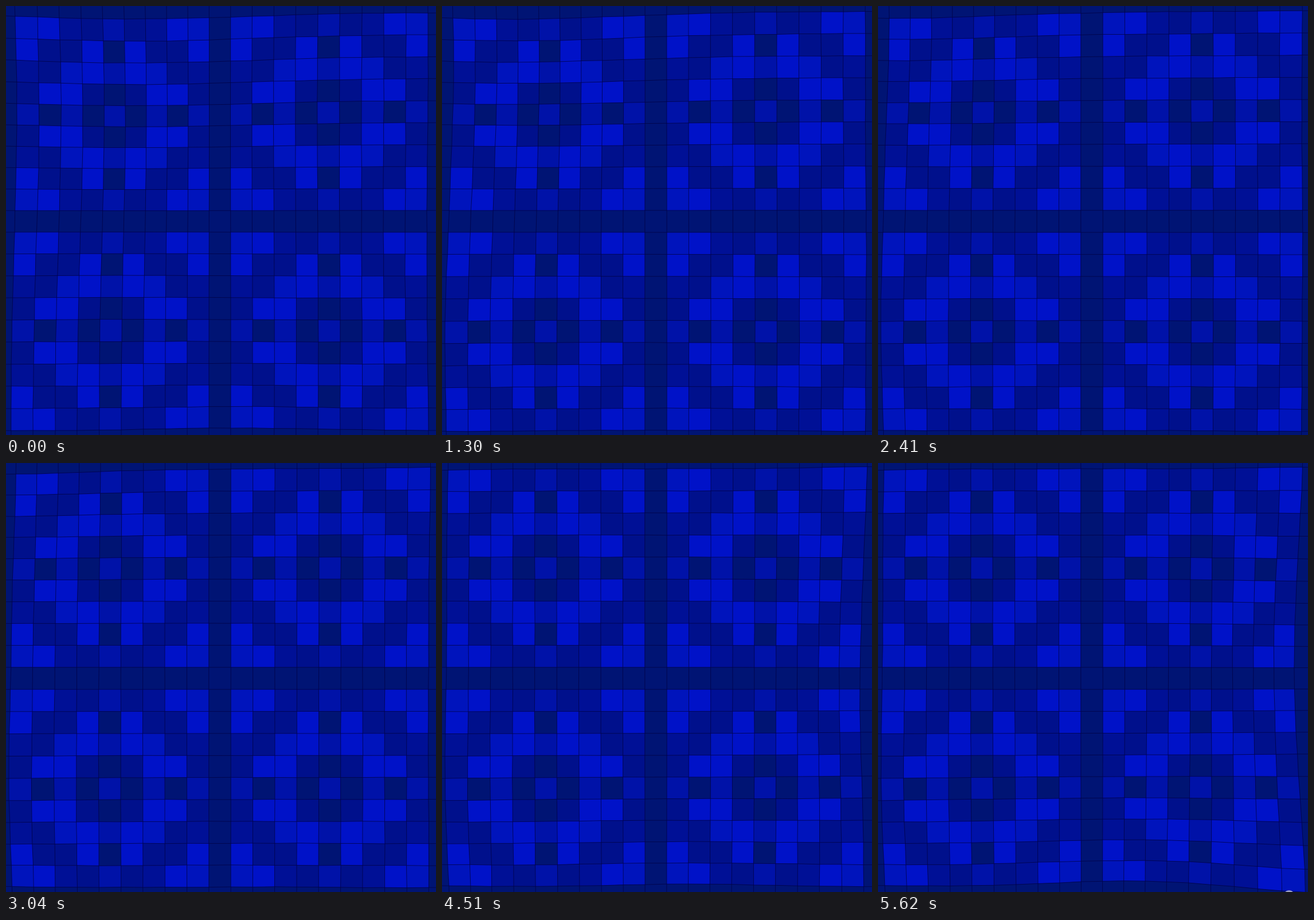
An HTML page with a canvas for the animation above (5.65 s loop, 750 px wide and 747 px high).

```html
<!DOCTYPE html>
<html lang="en">
<head>
<meta charset="utf-8">
<title>Woven grid</title>
<style>
html, body { margin: 0; width: 100%; height: 100%; overflow: hidden; background: #001474; }
canvas { display: block; width: 750px; height: 747px; }
</style>
</head>
<body>
<canvas id="stage" width="750" height="747"></canvas>
<script>
const ctx = document.getElementById('stage').getContext('2d');
const LOOP = 5650, CELL = 38, CX = 373, CY = 375, HALF = 10, EDGE = 9.5;

// Tint by product of the cell's column and row, modulo ten
const TINTS = ['#001474', '#0014bc', '#0012c8', '#001096', '#00108c', '#0012a8'];

// The cloth is stretched outwards from its centre by SWELL pixels at the edge.
// Soft dents drift over it and reduce the stretch; a negative depth bulges.
const SWELL = 3.8;
const pose = (time, x, y, size, depth) => ({ time, x, y, size, depth });
const DENTS = [
  // shrinks away through the upper left corner
  [pose(0, -4, -5, 8, 17), pose(4500, -13.5, -13.5, 5.5, 6)],
  // right edge, first bulging, then sinking in
  [pose(0, 12, 2, 6, 4), pose(2000, 12, 2, 7, -6), pose(4400, 12.5, 0.5, 6, 11), pose(5620, 12, -1, 6, 14)],
  // bottom edge
  [pose(0, 1, 12, 5, 6), pose(1800, 1, 12, 5, 0), pose(3700, 1, 12, 6, 3), pose(5620, 2, 12, 6.5, 14)],
  // lower left corner
  [pose(1300, -11, 11, 4, 0), pose(3700, -11, 11, 4, 6)],
  // left edge, below the middle
  [pose(0, -11, 7, 4, 0), pose(1000, -11, 5, 4, -4)],
  // upper right corner
  [pose(0, 11, -11, 5, 1), pose(4400, 11, -11, 5, -5)],
  // the pointer's tug at the lower right corner
  [pose(5100, 10, 10, 4, 0), pose(5620, 10, 10, 4, -12)]
];

const mix = (a, b, f) => a + (b - a) * f;

function poseAt(poses, t) {
  let i = 0;
  while (i < poses.length - 2 && t > poses[i + 1].time) i++;
  const a = poses[i], b = poses[i + 1];
  const f = Math.min(1, Math.max(0, (t - a.time) / (b.time - a.time)));
  return pose(t, mix(a.x, b.x, f), mix(a.y, b.y, f), mix(a.size, b.size, f), mix(a.depth, b.depth, f));
}

function stretch(dents, c, r) {
  return dents.reduce((sum, d) => {
    const far = ((c - d.x) ** 2 + (r - d.y) ** 2) / d.size ** 2;
    return sum - d.depth * Math.exp(-far);
  }, SWELL);
}

// Small unevenness of the threads, fading towards the pinned centre lines
function ripple(a, b, t) {
  const size = 0.5 * Math.min(1, Math.abs(a) / 8);
  return size * Math.sin(a * 2.3 + b * 1.7 + t / 520) * Math.cos(b * 0.9 - a + t / 810);
}

function buildMesh(t) {
  const dents = DENTS.map(poses => poseAt(poses, t));
  const mesh = [];
  for (let r = -HALF - 0.5; r <= HALF + 0.5; r++) {
    const row = [];
    for (let c = -HALF - 0.5; c <= HALF + 0.5; c++) {
      const scale = CELL + stretch(dents, c, r) / EDGE;
      row.push([CX + c * scale + ripple(c, r, t), CY + r * scale + ripple(r, c, t + 300)]);
    }
    mesh.push(row);
  }
  return mesh;
}

function tint(c, r) {
  const k = Math.abs(c * r) % 10;
  return TINTS[Math.min(k, 10 - k)];
}

function drawCells(mesh) {
  for (let r = 0; r <= 2 * HALF; r++) {
    for (let c = 0; c <= 2 * HALF; c++) {
      const corners = [mesh[r][c], mesh[r][c + 1], mesh[r + 1][c + 1], mesh[r + 1][c]];
      ctx.beginPath();
      corners.forEach(p => ctx.lineTo(...p));
      ctx.closePath();
      ctx.fillStyle = tint(c - HALF, r - HALF);
      ctx.fill();
    }
  }
}

function drawThreads(mesh) {
  ctx.beginPath();
  for (let i = 0; i < mesh.length; i++) {
    for (let j = 0; j < mesh.length - 1; j++) {
      ctx.moveTo(...mesh[i][j]);
      ctx.lineTo(...mesh[i][j + 1]);
      ctx.moveTo(...mesh[j][i]);
      ctx.lineTo(...mesh[j + 1][i]);
    }
  }
  ctx.lineWidth = 1;
  ctx.strokeStyle = 'rgba(0, 0, 64, 0.7)';
  ctx.stroke();
}

function drawPointer() {
  ctx.beginPath();
  ctx.arc(717, 754, 10, 0, Math.PI * 2);
  ctx.fillStyle = '#9a9ec8';
  ctx.fill();
}

function draw(t) {
  const mesh = buildMesh(t);
  ctx.fillStyle = TINTS[0];
  ctx.fillRect(0, 0, 750, 747);
  drawCells(mesh);
  drawThreads(mesh);
  if (t >= 5605) drawPointer();
}

const start = performance.now();
function tick() {
  draw((performance.now() - start) % LOOP);
  requestAnimationFrame(tick);
}
tick();
</script>
</body>
</html>
```
